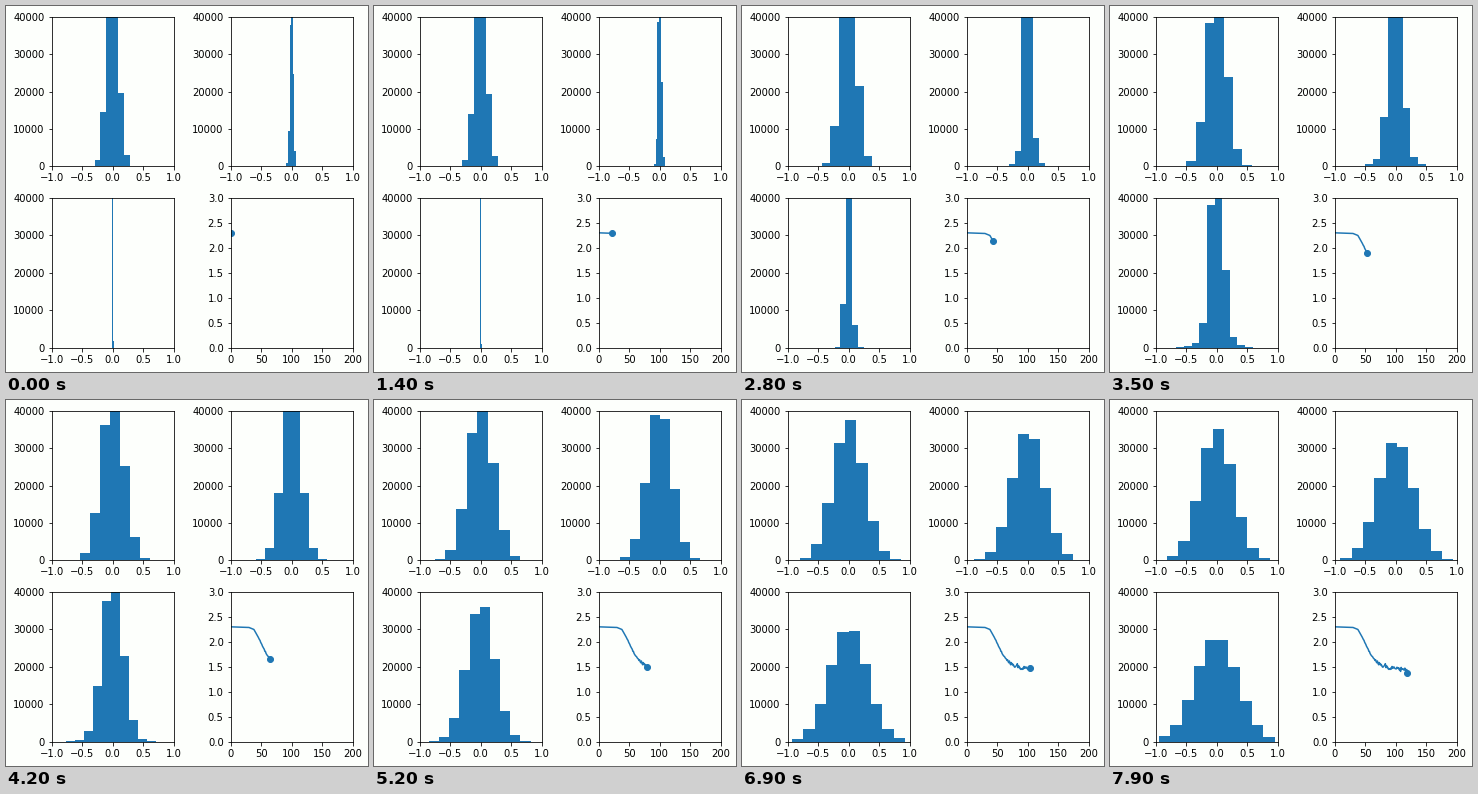
A matplotlib script for the animation above (8000 ms loop, 362x366 px).

```python
import math

import numpy as np
import matplotlib.pyplot as plt
from matplotlib.animation import FuncAnimation

W, H, DPI = 362, 366, 72
FRAMES, STEP_MS = 80, 100
PAPER, BLUE = "#fdfffc", "#1f77b4"
WEIGHTS, BINS = 129000, 10

plt.rcParams.update({"font.family": "DejaVu Sans", "font.size": 10})

normal_cdf = np.vectorize(lambda z: .5 * (1 + math.erf(z / math.sqrt(2))))


def mix(a, b, t):
    return a + (b - a) * t


class Layer:
    """Weights that start as a narrow bell and diffuse once training bites."""

    def __init__(self, sigma, rate, onset, width, lean, tail, first):
        self.sigma, self.rate, self.onset = sigma, rate, onset
        self.width, self.lean = width, lean
        self.tail, self.first = tail, first

    def spread(self, i):
        # Variance grows linearly after a soft onset
        grown = 2 * math.log1p(math.exp((i - self.onset) / 2))
        return math.sqrt(self.sigma ** 2 + self.rate * grown)

    def histogram(self, i):
        u = max(0, i - 12)
        t = 1 - math.exp(-u * u / (19 * (u + 8)))
        width = mix(*self.width, t)
        edges = width * (mix(*self.lean, t) + self.first + np.arange(BINS + 1))
        z = edges / self.spread(i)
        tail = self.tail * math.exp(-((i - 28) / 10) ** 2)
        cdf = mix(normal_cdf(z), normal_cdf(z / 2.33), tail)
        return edges[:-1], width, WEIGHTS * np.diff(cdf)


LAYERS = [
    Layer(.093, .0011, 22, (.096, .192), (-.1, -.35), 0, -4),
    Layer(.024, .00164, 29, (.026, .192), (-.3, .12), .2, -5),
    Layer(.0018, .0025, 32, (.018, .198), (-.78, .05), .2, -5),
]

# Loss: plateau, fast descent, slow noisy decline
steps = np.arange(121)
trend = np.interp(steps, [0, 30, 38, 45, 60, 72, 90, 120],
                  [2.303, 2.29, 2.25, 2.1, 1.72, 1.56, 1.48, 1.43])
noise = np.random.default_rng(4).normal(0, .03, steps.size)
loss = trend + noise * np.clip((steps - 40) / 60, 0, 1)


def panel(left, top, xticks, yticks):
    w, h = 122, 149.45
    ax = fig.add_axes([left / W, 1 - (top + h) / H, w / W, h / H],
                      facecolor=PAPER)
    ax.set_xticks(xticks)
    ax.set_yticks(yticks)
    ax.set_xlim(xticks[0], xticks[-1])
    ax.set_ylim(yticks[0], yticks[-1])
    ax.set_autoscale_on(False)
    return ax


fig = plt.figure(figsize=(W / DPI + 1e-9, H / DPI + 1e-9), dpi=DPI,
                 facecolor=PAPER)
cols, rows = (45.7, 224.7), (11, 192.1)
unit, counts = np.linspace(-1, 1, 5), np.arange(0, 40001, 10000)
bars = [panel(x, y, unit, counts).bar(np.zeros(BINS), np.zeros(BINS),
                                      color=BLUE)
        for x, y in ((cols[0], rows[0]), (cols[1], rows[0]),
                     (cols[0], rows[1]))]
loss_ax = panel(cols[1], rows[1], np.arange(0, 201, 50), np.linspace(0, 3, 7))
curve, = loss_ax.plot([], [], color=BLUE, lw=1.5)
head, = loss_ax.plot([], [], "o", color=BLUE, ms=6)


def update(i):
    for layer, group in zip(LAYERS, bars):
        lefts, width, heights = layer.histogram(i)
        for bar, x, height in zip(group, lefts, heights):
            bar.set_bounds(x, 0, width, height)
    step = 1 + 3 * i // 2
    curve.set_data(steps[:step + 1], loss[:step + 1])
    head.set_data([step], [loss[step]])
    return [curve, head, *(bar for group in bars for bar in group)]


anim = FuncAnimation(fig, update, frames=FRAMES, interval=STEP_MS,
                     repeat=True, repeat_delay=0, blit=False)
plt.show()
```
